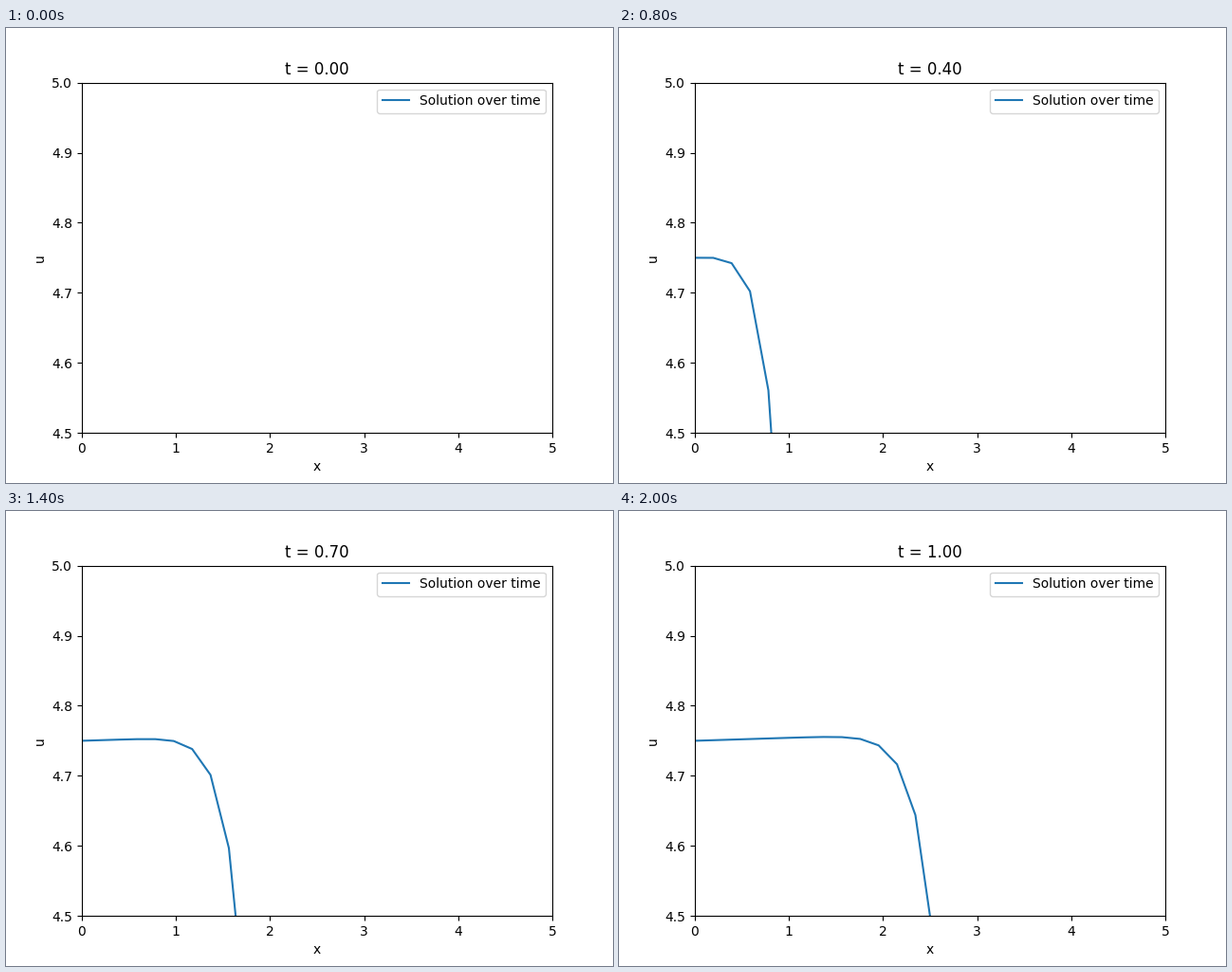
Write a matplotlib script that moves like this. It is 640x480 px and loops after 2100 ms.

```python
import numpy as np
import matplotlib.pyplot as plt
from matplotlib.animation import FuncAnimation

# Inviscid Burgers: u_t + (u^2 / 2)_x = 0.02 exp(0.02 x), u(0, t) = 4.75, u(x, 0) = 1
INFLOW = 4.75
DX = 100 / 512
DT = 0.01
STEPS_PER_FRAME = 5
FRAMES = 21

# The flow only runs rightwards, so cells past the visible range are not needed.
x = DX * np.arange(32)
source = 0.02 * np.exp(0.02 * x)


def step(u):
    """One backward Euler step with upwind fluxes, swept from left to right."""
    a = DT / (2 * DX)
    new = np.empty_like(u)
    new[0] = INFLOW
    for i in range(1, len(u)):
        rhs = u[i] + a * new[i - 1] ** 2 + DT * source[i]
        new[i] = (np.sqrt(1 + 4 * a * rhs) - 1) / (2 * a)
    return new


def solve():
    u = np.ones_like(x)
    states = [u]
    for _ in range(FRAMES - 1):
        for _ in range(STEPS_PER_FRAME):
            u = step(u)
        states.append(u)
    return states


states = solve()

fig, ax = plt.subplots(figsize=(6.4, 4.8), dpi=100)
line, = ax.plot(x, states[0], label="Solution over time")
ax.set_xlim(0, 5)
ax.set_ylim(4.5, 5)
ax.set_xlabel("x")
ax.set_ylabel("u")
title = ax.set_title("t = 0.00")
ax.legend(loc="upper right")


def update(k):
    line.set_ydata(states[k])
    title.set_text(f"t = {k * STEPS_PER_FRAME * DT:.2f}")
    return line, title


anim = FuncAnimation(fig, update, frames=FRAMES, interval=100,
                     repeat=True, repeat_delay=0, blit=False)
plt.show()
```
